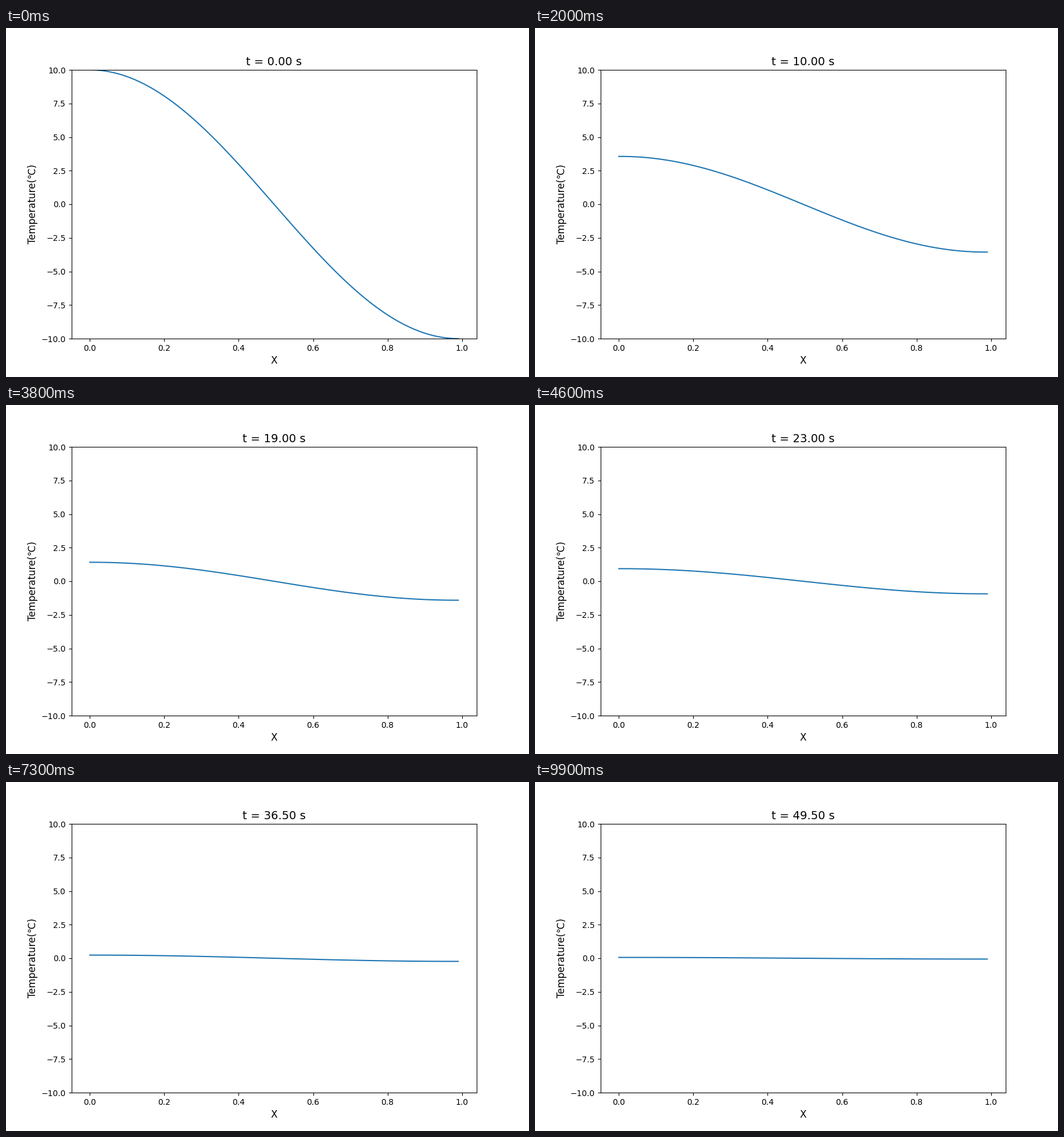
A matplotlib script for the animation above (10000 ms loop, 900x600 px).

```python
import numpy as np
import matplotlib.pyplot as plt
from matplotlib.animation import FuncAnimation

N = 100            # grid points along the rod
DX = 0.01
ALPHA = 0.01       # thermal diffusivity
DT = 0.0025
FRAMES = 100
FRAME_DT = 0.5     # simulated seconds per frame
INTERVAL = 100


def diffuse(u, steps):
    """Explicit heat equation with insulated ends."""
    u = u.copy()
    r = ALPHA * DT / DX**2
    for _ in range(steps):
        u[1:-1] += r * (u[2:] - 2 * u[1:-1] + u[:-2])
        u[0], u[-1] = u[1], u[-2]
    return u


x = np.arange(N) * DX
history = [10 * np.cos(np.linspace(0, np.pi, N))]
for _ in range(FRAMES - 1):
    history.append(diffuse(history[-1], round(FRAME_DT / DT)))

plt.rcParams["font.family"] = "DejaVu Sans"
fig, ax = plt.subplots(figsize=(9, 6), dpi=100)
line, = ax.plot(x, history[0], color="tab:blue", lw=1.5)
ax.set_ylim(-10, 10)
ax.set_xlabel("X", fontsize=12)
ax.set_ylabel("Temperature(℃)", fontsize=12)
title = ax.set_title("", fontsize=14)


def update(i):
    line.set_ydata(history[i])
    title.set_text(f"t = {i * FRAME_DT:.2f} s")
    return line, title


anim = FuncAnimation(fig, update, frames=FRAMES, interval=INTERVAL,
                     repeat=True, repeat_delay=0, blit=False)
plt.show()
```
